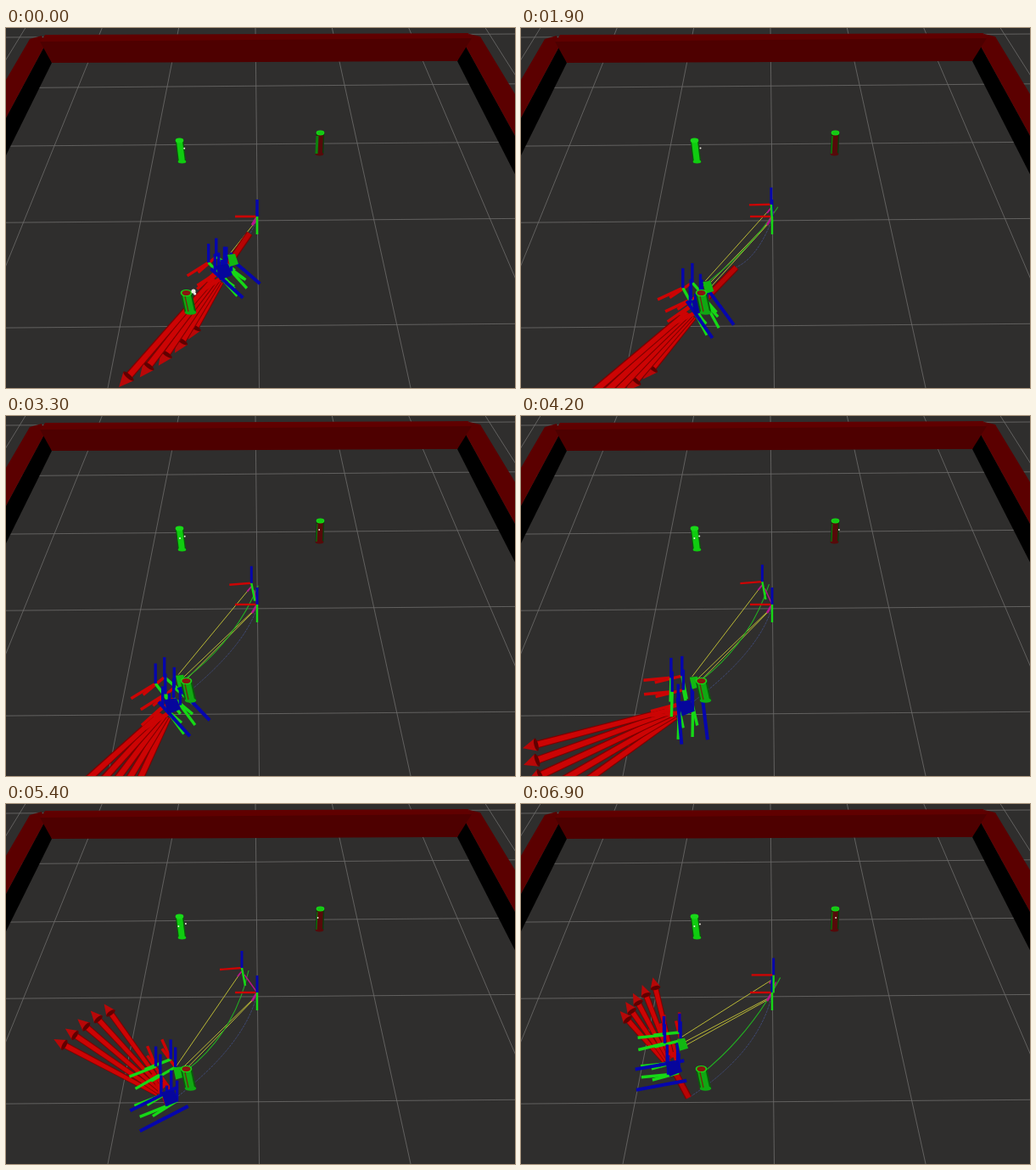
Animation of 600x424 px, one loop 7 s. Source, as an HTML page:

```html
<!DOCTYPE html>
<html lang="en">
<head>
<meta charset="utf-8">
<title>Robot navigation view</title>
<style>
html, body { margin: 0; width: 100%; height: 100%; overflow: hidden; background: #2f2e2d; }
svg { display: block; width: 100vw; height: 100vh; }
</style>
</head>
<body>
<svg viewBox="0 0 600 424" preserveAspectRatio="none">
  <rect width="600" height="424" fill="#2f2e2d"/>
  <g id="grid" stroke="#6f6e6c" stroke-width="0.8"></g>
  <g id="walls"></g>
  <g id="scene"></g>
</svg>
<script>
const LOOP = 7000, STEP = 100, HORIZON = -435, AXIS = 0.2, RAD = Math.PI / 180;
const RED = '#cc0404', GREEN = '#16d816', BLUE = '#0606ac', YELLOW = '#b9b836', PINK = '#b8148c';
const $ = id => document.getElementById(id);

// Key points: time, then ground position, angle or screen position
const drive = [[0, -0.274, 0.53], [2400, -0.63, 0.92], [5400, -0.65, 0.97], [LOOP, -0.77, 0.7]];
const turn = [[0, 118], [2600, 130], [3300, 119], [4200, 151], [5400, 221], [LOOP, 241]];
const drift = [[0, 296, 222], [1100, 297, 219], [2600, 293, 198], [5400, 278, 193], [LOOP, 299, 202]];

const mix = (a, b, k) => a + (b - a) * k;
const n = v => v.toFixed(1);

function ease(t, from, to) {
  const k = Math.min(1, Math.max(0, (t - from) / (to - from)));
  return k * k * (3 - 2 * k);
}

function at(keys, t) {
  let i = 0;
  while (i < keys.length - 2 && t > keys[i + 1][0]) i++;
  const a = keys[i], b = keys[i + 1], k = (t - a[0]) / (b[0] - a[0]);
  return a.slice(1).map((v, j) => mix(v, b[j + 1], k));
}

function rand(seed) {
  const v = Math.sin(seed * 127.1 + 11.7) * 43758.5453;
  return v - Math.floor(v);
}

// Ground cells (x right, z towards the viewer, up) to screen
const depth = z => 1 / (0.001511 - 0.0002382 * z);
function project(x, z, up = 0) {
  const w = depth(z), y = w + HORIZON;
  return [294 + 0.0107 * y + x * 0.2078 * w, y - up * 0.152 * w];
}
const step = ([x, z], deg, d) => [x + Math.cos(deg * RAD) * d, z + Math.sin(deg * RAD) * d];

const line = (a, b, col, w) =>
  `<path d="M${a.map(n)}L${b.map(n)}" stroke="${col}" stroke-width="${w}"/>`;
const curve = (a, c, b, col, w, dash = 'none') =>
  `<path d="M${a.map(n)}Q${c.map(n)} ${b.map(n)}" stroke="${col}" stroke-width="${w}" stroke-dasharray="${dash}" fill="none"/>`;
const shape = (pts, col) => `<polygon points="${pts.map(p => p.map(n)).join(' ')}" fill="${col}"/>`;
const oval = (x, y, rx, ry, col) =>
  `<ellipse cx="${n(x)}" cy="${n(y)}" rx="${rx}" ry="${ry}" fill="${col}"/>`;
const add = (p, x, y) => [p[0] + x, p[1] + y];

function arrow(from, to) {
  const len = Math.hypot(to[0] - from[0], to[1] - from[1]);
  const c = (to[0] - from[0]) / len, s = (to[1] - from[1]) / len;
  const size = (to[1] - HORIZON) / 750, neck = len - 15 * size;
  const p = (f, l) => [from[0] + c * f - s * l * size, from[1] + s * f + c * l * size];
  const [bx, by] = p(neck, 0), deg = n(Math.atan2(s, c) / RAD);
  return shape([p(0, -3), p(neck, -4.2), p(neck, 4.2), p(0, 3)], '#7c0000') +
    shape([p(0, -2.2), p(neck, -3.2), p(neck, 3), p(0, 2)], RED) +
    shape([p(neck, -7), p(len, 0), p(neck, 7)], '#b80808') +
    `<ellipse cx="${n(bx)}" cy="${n(by)}" rx="2.4" ry="${n(7 * size)}" transform="rotate(${deg} ${n(bx)} ${n(by)})" fill="#600000"/>`;
}

function pillar(x, y, lean, h, r, body, edge, cap) {
  const strip = (a, b, col) =>
    shape([[x + a * r, y], [x + b * r, y], [x + lean + b * r, y + h], [x + lean + a * r, y + h]], col);
  return strip(-1, 1, edge) + oval(x + lean, y + h, r, r * 0.4, body) + strip(-0.75, 0.7, body) +
    oval(x, y, r, r * 0.6, GREEN) + oval(x, y, r * 0.75, r * 0.45, cap);
}

// Axes of a pose: red ahead, green to the left, blue up
function pose(x, z, up, deg, w) {
  const o = project(x, z, up);
  const tip = a => project(...step([x, z], a, AXIS), up);
  return {
    red: line(o, tip(deg), RED, w),
    green: line(o, tip(deg - 90), GREEN, w),
    blue: line(o, project(x, z, up + AXIS), BLUE, w)
  };
}

function robot(base, top, deg) {
  const layers = { red: '', green: '', blue: '' };
  const put = (o, f, l) => step(step(o, deg, f), deg - 90, l);
  const keep = p => { for (const k in layers) layers[k] += p[k]; };
  for (let i = 0; i < 4; i++) {
    const side = i % 2 ? 1 : -1, row = i < 2 ? 1 : -1;
    keep(pose(...put(base, row * 0.05, side * 0.04), 0, deg + side * 6, 3.4));
    keep(pose(...put(base, row * 0.04 + 0.06, side * 0.06), top, deg + row * 5, 3.4));
    const hub = put(base, row * 0.09 - 0.04, side * 0.09);
    layers.blue += line(project(...hub), project(...step(hub, deg - 90, AXIS * 0.95)), BLUE, 4);
  }
  const c = project(...base), u = project(...base, top);
  return layers.red + layers.green + layers.blue +
    shape([add(c, -9, -7), add(c, 6, -9), add(c, 11, 4), add(c, -4, 10)], '#06069c') +
    shape([add(u, 5, -6), add(u, 14, -7), add(u, 18, 5), add(u, 8, 8)], '#12b812');
}

function frameAxes(o, lean) {
  return line(o, add(o, -26, lean), RED, 2.4) + line(o, add(o, lean * 2, 21), GREEN, 2.4) +
    line(o, add(o, 0, -20), BLUE, 3);
}

function links(t, map, odom, u, rear) {
  const late = ease(t, 1100, 2200), end = add(u, 8, -7);
  let out = line(add(odom, -1, 5), end, YELLOW, 1);
  if (late) {
    out += line(add(map, -3, 6), add(end, 3, 6 * late), YELLOW, 1) +
      line(add(map, -4, 8), add(end, 6, 9 * late), YELLOW, 1) +
      curve(add(odom, 8, 3), [270, mix(258, 272, t / LOOP)], [213, mix(300, 318, t / LOOP)], '#22b022', 1.1) +
      line(add(odom, 3, 8), map, PINK, 1.4);
  }
  return out + curve(add(map, -1, 6), [278, mix(262, 295, t / LOOP)], rear, '#414c7c', 0.9, '3 1') +
    line(map, add(map, -6, 10), PINK, 2.6) + line(add(odom, 0, 4), add(odom, -5, 10), PINK, 1.8);
}

function specks(t) {
  const q = t / STEP, dot = (x, y, r) => oval(x, y, r, r, '#eceae0');
  let out = dot(210 + rand(q + 3) * 2, 141 + rand(q), 1);
  if (t > 3000) out += dot(203 + rand(q) * 3, 144, 1) + dot(367 + rand(q + 7) * 8, 134, 0.9);
  if (t < 1800) out += dot(221, 310, 2.6) + dot(222 + rand(q), 313, 1.6);
  return out;
}

function draw(t) {
  const base = at(drive, t), [dir] = at(turn, t), odom = at(drift, t), map = [296, 222];
  const top = mix(0.13, 0.25, ease(t, 1100, 2600));
  const rearLen = 0.44 * (1 - ease(t, 2500, 3200)) + 0.29 * ease(t, 5000, 6900);
  const rear = project(...step(base, dir + 180, rearLen)), c = project(...base);

  let out = pillar(204.5, 132.5, 3, 25, 4.8, '#10cc10', '#0a5a0a', '#1ad81a') +
    pillar(370.5, 123.5, -1, 25, 4.8, '#560a0a', '#0c3c0c', '#14c814') +
    line([367, 127], [366, 148], '#0e800e', 1 + 3 * (1 - ease(t, 900, 2400)) * rand(t / STEP)) +
    links(t, map, odom, project(...base, top), rear) + frameAxes(map, 0) +
    frameAxes(odom, 2 * ease(t, 1500, 2600) * (1 - ease(t, 6000, 6900)));
  if (rearLen > 0.03) out += line(rear, c, '#7c0000', 8) + line(rear, c, '#b80404', 5.5);

  // Fan of five poses ahead of the robot
  const spread = mix(8, 14, ease(t, 2400, 3400)), tail = step(base, dir, 0.09);
  const shortest = mix(0.53, 1.02, ease(t, 1700, 3200)) - 0.35 * ease(t, 5400, 6900);
  for (let i = 0; i < 5; i++) {
    const k = i / 2 - 1, len = mix(shortest, 1.04 - 0.14 * ease(t, 4800, 6900), i / 4);
    const tip = step(tail, dir + k * spread, len);
    out += arrow(project(...step(tail, dir + 90, k * 0.035)), project(...tip));
  }

  out += robot(base, top, dir + 18);
  out += pillar(212.5, 312, 5, 23, 6.8, '#10a812', '#0a5c0a', '#8a1410') +
    line([211, 316], [215, 334], '#6e2a10', 1.3) + specks(t);
  $('scene').innerHTML = out;
}

function drawGrid() {
  let out = '';
  for (let i = -3; i <= 3; i++) {
    const x = y => 294 + 0.0107 * y + i * 0.2078 * (y - HORIZON);
    out += line([x(0), 0], [x(424), 424], '#6f6e6c', 0.8);
  }
  for (let z = -2; z <= 1; z++) {
    const y = depth(z) + HORIZON;
    out += line([0, y + 2.4], [600, y - 2.4], '#6f6e6c', 0.8);
  }
  $('grid').innerHTML = out + line([0, 11], [600, 7], '#6f6e6c', 0.8);
}

function drawWalls() {
  // Follow an edge from the vanishing point to the side of the stage
  const run = ([x, y], side) => [side, y + (side - x) * (y - HORIZON) / (x - 290)];
  const arm = (side, outer, rim, inner, foot) =>
    shape([inner, foot, run(foot, side), run(inner, side)], '#000') +
    shape([outer, rim, inner, run(inner, side), run(outer, side)], '#5b0000');
  $('walls').innerHTML =
    arm(0, [28, 13], [42, 9], [46, 20], [54, 41]) +
    arm(600, [559, 10], [546, 7], [540, 18], [532, 39]) +
    shape([[46, 8], [545, 6], [549, 13], [40, 17]], '#600000') +
    shape([[40, 16], [549, 12], [532, 39], [54, 41]], '#4e0000');
}

let last = -1;
const start = performance.now();
function tick() {
  const t = Math.floor(((performance.now() - start) % LOOP) / STEP) * STEP;
  if (t !== last) draw(last = t);
  requestAnimationFrame(tick);
}
drawGrid();
drawWalls();
tick();
</script>
</body>
</html>
```
